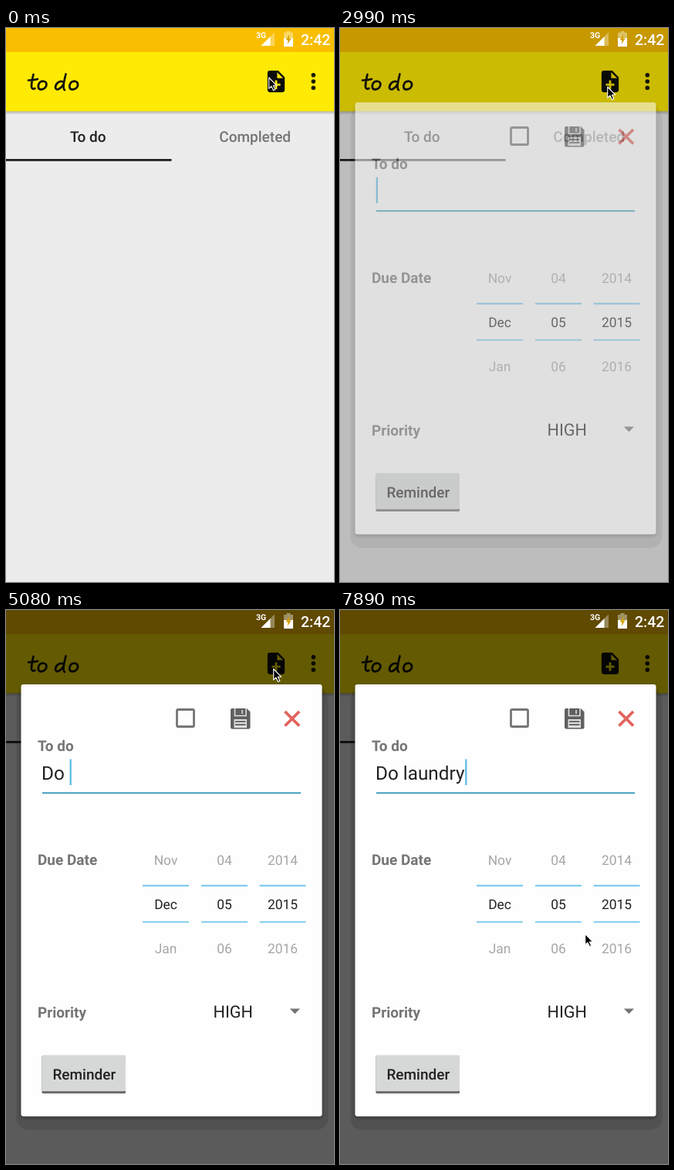
Animation of 425 by 715 pixels, one loop 8 s. Source, as an HTML page:

```html
<!DOCTYPE html>
<html lang="en">
<head>
<meta charset="utf-8">
<title>To do</title>
<style>
  html, body { margin: 0; width: 100%; height: 100%; overflow: hidden; background: #ebebeb; }
  svg { display: block; width: 425px; height: 715px; }
  text { font: 400 17.4px Roboto, sans-serif; fill: #212121; text-rendering: geometricPrecision; }
  .mid { text-anchor: middle; }
  .medium { font-weight: 500; font-size: 19px; }
  .label { font-weight: 700; font-size: 19px; fill: #757575; }
  .faint { fill: #a6a6a6; }
  .input { font-size: 24.3px; }
  .spinner { font-size: 21.6px; }
</style>
</head>
<body>
<svg viewBox="0 0 425 715">
  <defs>
    <linearGradient id="barShadow" x2="0" y2="1">
      <stop stop-color="#000" stop-opacity=".27"/>
      <stop offset="1" stop-color="#000" stop-opacity="0"/>
    </linearGradient>
    <clipPath id="barClip"><rect y="31" width="425" height="76.5"/></clipPath>
    <filter id="soft" x="-10%" y="-10%" width="120%" height="120%"><feGaussianBlur stdDeviation="2"/></filter>
  </defs>

  <g id="app">
    <rect width="425" height="715" fill="#ececec"/>
    <rect y="107" width="425" height="5" fill="url(#barShadow)"/>
    <rect width="425" height="31" fill="#f9be00"/>
    <rect y="31" width="425" height="76.5" fill="#ffea04"/>
    <circle id="ripple" cx="350" cy="69" r="46" fill="#000" opacity=".055" clip-path="url(#barClip)"/>
    <g role="img" aria-label="to do" fill="none" stroke="#15130a" stroke-width="2.7" stroke-linecap="round" stroke-linejoin="round">
      <path d="M35.5 60Q33 69 33 75.500Q33.500 80 37.500 78M29 67.500Q35 67.500 41 66"/>
      <path d="M48 68.500C43.500 68.500 41 73 42 77C43.500 81 50 79.500 52 75C53.500 70.500 50.500 68 47 69"/>
      <path d="M74 69.500C69 67.500 64 72 64 77C65 82 72 78 75 71.500M77.500 59.500Q75 69 74.500 75Q74.500 79 76 80"/>
      <path d="M89 68.500C84 68.500 81.500 73 82.500 77C84 81 91 79.500 92.800 75C94 70.500 91 68 87.500 69"/>
    </g>
    <path transform="translate(333.300 52.300) scale(1.39)" fill="#0c0c0c" d="M14 2H6c-1.100 0-2 .9-2 2v16c0 1.100.9 2 2 2h12c1.100 0 2-.9 2-2V8l-6-6zm2 14h-3v3h-2v-3H8v-2h3v-3h2v3h3v2zm-3-7V3.500L18.500 9H13z"/>
    <g fill="#1c1a08">
      <circle cx="398.300" cy="60.800" r="2.800"/>
      <circle cx="398.300" cy="69" r="2.800"/>
      <circle cx="398.300" cy="77.200" r="2.800"/>
    </g>
    <text class="medium mid" x="106.300" y="146.500">To do</text>
    <text class="medium mid" x="322.700" y="146.500" style="fill:#757575">Completed</text>
    <rect y="169" width="214.500" height="2.800" fill="#212121"/>
  </g>

  <rect id="dim" width="425" height="715"/>

  <g id="status" fill="#fff">
    <text x="324" y="13" style="font-size:10.500px;font-weight:700;fill:#fff">3G</text>
    <path d="M348 5.500V23H330.500Z" opacity=".35"/>
    <path d="M342.500 11V23H330.500Z"/>
    <path d="M360 6H363.500V4H368.500V6H372V14H360Z" opacity=".4"/>
    <path d="M360 13H372V24H360Z"/>
    <path d="M367.500 8L362.500 15.500H365.500L364.500 21L369.800 13.500H366.600Z" fill="#d3a000"/>
    <text x="382" y="21.700" style="font-size:19.500px;font-weight:500;fill:#fff">2:42</text>
  </g>

  <g id="dialog">
    <rect x="13.500" y="101" width="404" height="570" rx="15" opacity=".11"/>
    <rect x="19" y="98" width="391" height="558" rx="5" opacity=".3" filter="url(#soft)"/>
    <rect x="19.500" y="96" width="390" height="557.500" rx="3" fill="#fefefe"/>

    <rect x="221.500" y="128.500" width="22" height="22" rx="1.500" fill="none" stroke="#757575" stroke-width="2.800"/>
    <path d="M293 127H312L316.500 131.500V151.500Q316.500 153.500 314.500 153.500H293Q291 153.500 291 151.500V129Q291 127 293 127Z" fill="#5f5f5f"/>
    <path d="M296.500 127V136.500H311V127M306 129V134" fill="none" stroke="#e4e4e4" stroke-width="1.500"/>
    <path d="M295.500 141H312V152H295.500Z" fill="#dedede"/>
    <path d="M297 144H310.500M297 148H310.500" stroke="#6b6b6b" stroke-width="1.800"/>
    <path d="M361.500 131L380 149.500M380 131L361.500 149.500" stroke="#e2625c" stroke-width="3.800"/>

    <text class="label" x="41" y="182">To do</text>
    <text class="input" id="entry" x="46" y="218.500"></text>
    <rect id="caret" y="192.500" width="2.300" height="33.500" fill="#5bbce2"/>
    <rect x="47" y="235.200" width="335" height="1.900" fill="#3f9fbd"/>

    <text class="label" x="41" y="329">Due Date</text>
    <g id="picker"></g>

    <text class="label" x="41" y="526">Priority</text>
    <text class="spinner" x="268.500" y="526">HIGH</text>
    <path d="M367.800 514.500H381L374.400 521.300Z" fill="#757575"/>

    <rect x="46.500" y="575" width="108.500" height="49" rx="1.500" fill="#6e6e6e"/>
    <rect x="46.500" y="574.500" width="108.500" height="46.500" rx="1.500" fill="#d6d8d7"/>
    <text class="medium mid" x="101.300" y="606.300">Reminder</text>
  </g>

  <path id="mouse" d="M.7 1V15.200L3.900 12.200L6.500 17.600L8.800 16.500L6.300 11.300H10.700Z" fill="#000" stroke="#fff" stroke-width="1.100" stroke-linejoin="round"/>
</svg>

<script>
  const LOOP = 8000;
  const $ = id => document.getElementById(id);

  $('picker').innerHTML = [
    [207, 'Nov', 'Dec', 'Jan'],
    [283, '04', '05', '06'],
    [358.5, '2014', '2015', '2016'],
  ].map(([x, before, current, after]) => `
    <text class="mid faint" x="${x}" y="329">${before}</text>
    <text class="mid" x="${x}" y="386">${current}</text>
    <text class="mid faint" x="${x}" y="442.500">${after}</text>
    <path d="M${x - 30} 355.700h60m-60 46.900h60" stroke="#72c6ea" stroke-width="1.900"/>`).join('');

  // Each track lists [start time, ...values]; values hold until the next entry.
  const mouseTrack = [
    [0, 340, 63], [900, 333, 73], [1050, 327, 80], [1350, 337, 78], [1500, 346, 75],
    [7300, 357, 132], [7450, 369, 258], [7590, 357, 375], [7740, 333, 422], [7890, 317, 417],
  ];
  const sceneTrack = [[0, 0, 0, 0], [2840, 1, 0, 0], [2990, 0, .2, .55], [3140, 0, .61, 1]];
  const typedTrack = [
    [0, 0], [4490, 1], [4640, 2], [5080, 3], [5230, 4], [5380, 5],
    [5830, 6], [6120, 7], [6270, 8], [6420, 9], [6710, 10],
  ];
  const caretTrack = [[0, 1], [3440, 0], [3890, 1], [7150, 0], [7590, 1]];
  const phrase = 'Do\u00a0laundry';

  const valuesAt = (track, t) => track.findLast(([start]) => start <= t).slice(1);

  function draw(now) {
    const t = now % LOOP;
    const [x, y] = valuesAt(mouseTrack, t);
    const [ripple, dim, dialog] = valuesAt(sceneTrack, t);
    const [count] = valuesAt(typedTrack, t);
    const [caret] = valuesAt(caretTrack, t);
    const entry = $('entry');
    const typed = phrase.slice(0, count);

    $('mouse').setAttribute('transform', `translate(${x} ${y})`);
    $('ripple').style.visibility = ripple ? 'visible' : 'hidden';
    $('dim').style.opacity = dim;
    $('dialog').style.opacity = dialog;
    if (entry.textContent !== typed) entry.textContent = typed;
    $('caret').setAttribute('x', 46.7 + (count ? entry.getComputedTextLength() : 0));
    $('caret').style.opacity = caret;
  }

  let origin;
  function tick(now) {
    origin ??= now;
    draw(now - origin);
    requestAnimationFrame(tick);
  }
  draw(0);
  requestAnimationFrame(tick);
</script>
</body>
</html>
```
